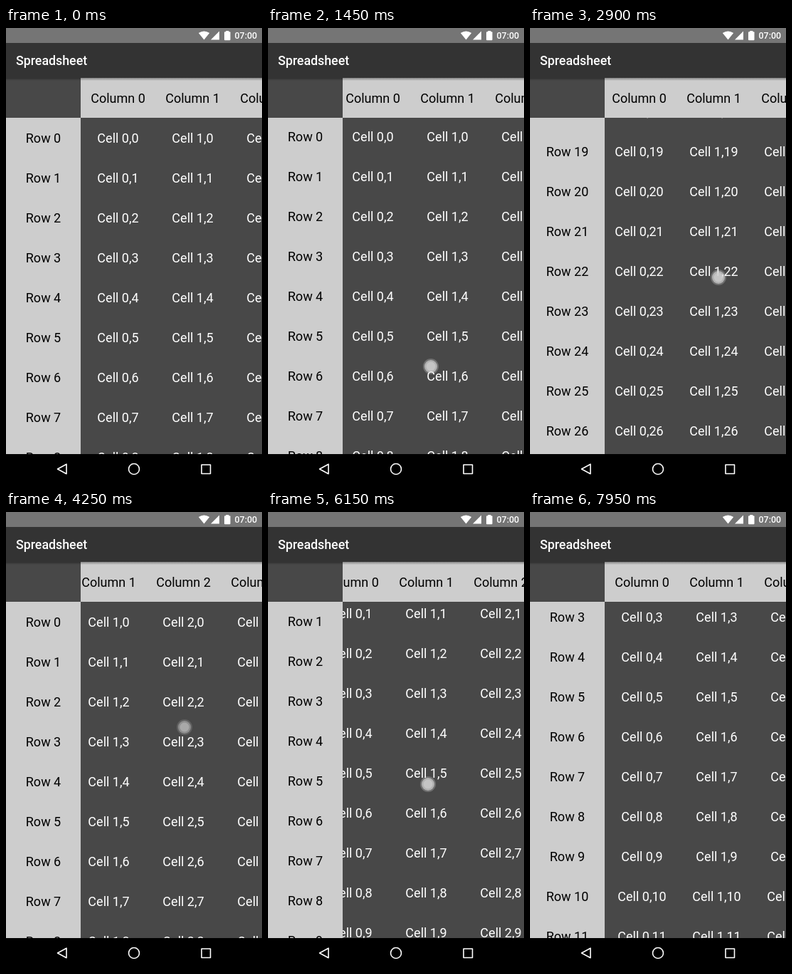
These frames come from a looping animation (360x640 px, 8000 ms). An HTML page with a canvas:

```html
<!DOCTYPE html>
<html lang="en">
<head>
<meta charset="utf-8">
<title>Spreadsheet</title>
<style>
  html, body { margin: 0; width: 100%; height: 100%; overflow: hidden; background: #000; }
  canvas { display: block; width: 100%; height: 100%; }
</style>
</head>
<body>
<canvas width="360" height="640"></canvas>
<script>
const ctx = document.querySelector('canvas').getContext('2d');
const LOOP = 8000, STEP = 50, ROW_LAG = 16;
const CELL_W = 105, CELL_H = 56, TOP = 70, BOTTOM = 598;
const DARK = '#484848', LIGHT = '#cdcdcd';

const linear = u => u;
const smooth = u => u * u * (3 - 2 * u);
const fling = u => 1 - (1 - u) ** 3;

// Scroll offset over time: [ms, x, y, easing towards this point]
const scrollKeys = [
  [0, 0, 0, linear], [450, 0, 0, linear],
  [900, 75, 85, smooth], [1450, 10, 2, smooth],
  [1500, 10, 2, linear], [1650, 6, 150, linear], [2100, 4, 520, fling],
  [2150, 4, 520, linear], [2300, 4, 680, linear], [2850, 4, 1045, fling],
  [2900, 4, 1045, linear], [3050, 2, 820, linear], [3350, 0, 0, linear],
  [4000, 0, 0, linear], [4200, 80, 0, linear], [4250, 118, 0, linear], [4950, 421, 0, fling],
  [5200, 421, 0, linear], [5350, 290, 0, linear], [5700, 0, 0, fling],
  [6050, 0, 0, linear], [6300, 100, 170, linear], [7000, 262, 442, fling],
  [7200, 262, 442, linear], [7400, 150, 350, linear], [7950, -60, 175, fling],
  [8000, -60, 175, linear]
];

// A finger goes down at (x, y) and drags the sheet until it lifts.
const touches = [
  { down: 450, up: 1650, x: 239, y: 477 },
  { down: 2150, up: 2300, x: 250, y: 480 },
  { down: 2850, up: 3050, x: 265, y: 350 },
  { down: 4000, up: 4200, x: 331, y: 302 },
  { down: 5100, up: 5350, x: 209, y: 324 },
  { down: 6050, up: 6300, x: 265, y: 450 },
  { down: 7200, up: 7400, x: 170, y: 300 }
];
const FADE = 130;

function scrollAt(time) {
  const t = Math.max(0, time);
  const next = Math.max(1, scrollKeys.findIndex(key => key[0] >= t));
  const [t0, x0, y0] = scrollKeys[next - 1];
  const [t1, x1, y1, ease] = scrollKeys[next];
  const u = ease((t - t0) / (t1 - t0));
  return {
    x: Math.max(0, Math.round(x0 + (x1 - x0) * u)),
    y: Math.max(0, Math.round(y0 + (y1 - y0) * u))
  };
}

function rect(color, x, y, w, h) {
  ctx.fillStyle = color;
  ctx.fillRect(x, y, w, h);
}

function disc(color, x, y, r) {
  ctx.fillStyle = color;
  ctx.beginPath();
  ctx.arc(x, y, r, 0, 2 * Math.PI);
  ctx.fill();
}

function polygon(...points) {
  ctx.beginPath();
  points.forEach(([x, y]) => ctx.lineTo(x, y));
  ctx.closePath();
}

function label(text, x, y, color, font = '18px', align = 'center') {
  ctx.font = font + ' Roboto, sans-serif';
  ctx.textAlign = align;
  ctx.fillStyle = color;
  ctx.fillText(text, x, y);
}

function clipped(x, y, w, h, draw) {
  ctx.save();
  ctx.beginPath();
  ctx.rect(x, y, w, h);
  ctx.clip();
  draw();
  ctx.restore();
}

// Calls draw(index, start) for every visible band.
function eachBand(scroll, origin, size, end, draw) {
  for (let i = Math.floor(scroll / size); origin + i * size - scroll < end; i++) {
    draw(i, origin + i * size - scroll);
  }
}

function drawSheet(t) {
  const scroll = scrollAt(t), rowScroll = scrollAt(t - ROW_LAG);
  const bodyTop = TOP + CELL_H, bodyH = BOTTOM - bodyTop, bodyW = 360 - CELL_W;
  const columns = draw => eachBand(scroll.x, CELL_W, CELL_W, 360, draw);
  const rows = (y, draw) => eachBand(y, bodyTop, CELL_H, BOTTOM, draw);

  rect(DARK, 0, TOP, 360, BOTTOM - TOP);
  rect(LIGHT, CELL_W, TOP, bodyW, CELL_H);
  rect(LIGHT, 0, bodyTop, CELL_W, bodyH);

  clipped(CELL_W, TOP, bodyW, CELL_H, () =>
    columns((c, x) => label('Column ' + c, x + CELL_W / 2, TOP + 35, '#000')));
  clipped(0, bodyTop, CELL_W, bodyH, () =>
    rows(rowScroll.y, (r, y) => label('Row ' + r, CELL_W / 2, y + 35, '#000')));
  clipped(CELL_W, bodyTop, bodyW, bodyH, () =>
    columns((c, x) => rows(scroll.y, (r, y) =>
      label(`Cell ${c},${r}`, x + CELL_W / 2, y + 35, '#fff'))));
}

function drawTouch(t) {
  const touch = touches.find(p => t >= p.down && t < p.up + FADE);
  if (!touch) return;
  const start = scrollAt(touch.down), now = scrollAt(Math.min(t, touch.up));
  const x = touch.x + start.x - now.x, y = touch.y + start.y - now.y;
  ctx.globalAlpha = Math.min(1, 1 - (t - touch.up) / FADE);
  disc('rgba(255,255,255,.22)', x, y, 11);
  disc('rgba(222,222,222,.6)', x, y, 9);
  disc('rgba(205,205,205,.7)', x, y, 6.5);
  ctx.globalAlpha = 1;
}

function drawBars() {
  rect('#757575', 0, 0, 360, 21);
  rect('#333', 0, 21, 360, 49);
  const shadow = ctx.createLinearGradient(0, TOP, 0, TOP + 4);
  shadow.addColorStop(0, 'rgba(0,0,0,.35)');
  shadow.addColorStop(1, 'rgba(0,0,0,0)');
  rect(shadow, 0, TOP, 360, 4);
  label('Spreadsheet', 14, 52, '#fff', '500 17.8px', 'left');

  // Status icons: wifi, signal, battery, clock
  ctx.fillStyle = '#fff';
  ctx.beginPath();
  ctx.moveTo(278.5, 16.5);
  ctx.lineTo(270.8, 7);
  ctx.quadraticCurveTo(278.5, 1.8, 286.2, 7);
  ctx.fill();
  polygon([288, 16.5], [300, 16.5], [300, 4.5]);
  ctx.fill();
  ctx.beginPath();
  ctx.roundRect(307, 5.3, 8.5, 12, 1);
  ctx.fill();
  ctx.fillRect(309.3, 4, 4, 2);
  label('07:00', 353, 15, '#fff', '500 12.4px', 'right');

  // Navigation buttons
  rect('#000', 0, BOTTOM, 360, 640 - BOTTOM);
  ctx.strokeStyle = '#fff';
  ctx.lineWidth = 1.6;
  ctx.lineJoin = 'round';
  polygon([72.5, 619], [85, 612.2], [85, 625.8]);
  ctx.stroke();
  ctx.beginPath();
  ctx.arc(180, 619, 7.5, 0, 2 * Math.PI);
  ctx.stroke();
  ctx.strokeRect(275, 613, 12.5, 12.5);
}

const startTime = performance.now();
function frame() {
  const elapsed = (performance.now() - startTime) % LOOP;
  const t = Math.floor(elapsed / STEP) * STEP;
  drawSheet(t);
  drawTouch(t);
  drawBars();
  requestAnimationFrame(frame);
}
frame();
</script>
</body>
</html>
```
